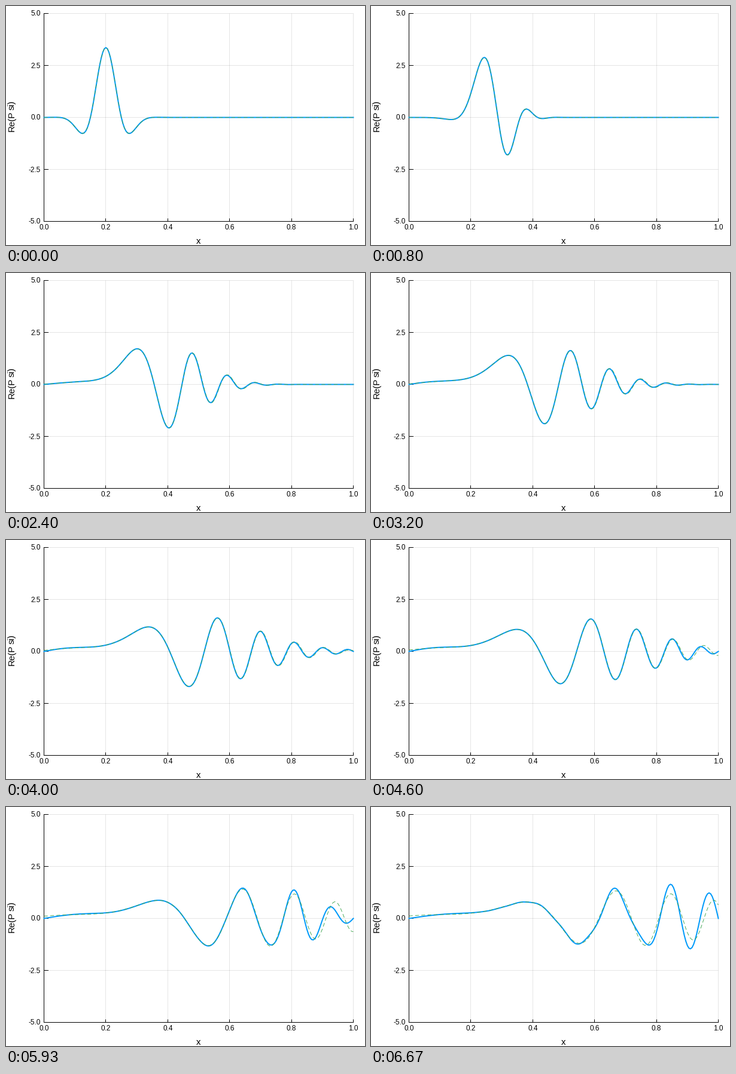
Write a matplotlib script that moves like this. It is 600 by 400 pixels and loops after 6740 ms.

```python
import numpy as np
import matplotlib.pyplot as plt
from matplotlib.animation import FuncAnimation

W, H, DPI = 600, 400, 100
LEFT, RIGHT, TOP, BOTTOM = 63.5, 580.5, 12.5, 360.5
TICK_MS, LOOP_MS = 10, 6740
FPS, LAST = 15, 100
BLUE, GREEN = "#009afa", "#3da44d"

# wave packet and grid
X0, SIGMA, K0 = 0.2, 0.05, 10 * np.pi
STEP = 1.575e-4
N = 200
DX = 1 / N
x = np.linspace(0, 1, N + 1)


def packet(t):
    """Freely spreading Gaussian packet."""
    spread = 1 + 1j * t / SIGMA**2
    xi = x - X0
    norm = (np.pi * SIGMA**2) ** -0.25 / np.sqrt(spread)
    envelope = np.exp(-((xi - K0 * t) ** 2) / (2 * SIGMA**2 * spread))
    return norm * envelope * np.exp(1j * (K0 * xi - K0**2 * t / 2))


# modes of the finite-difference box with walls at 0 and 1
modes = np.arange(1, N)
sines = np.sin(np.pi * np.outer(x, modes))
energy = (1 - np.cos(np.pi * modes * DX)) / DX**2
coeffs = 2 * DX * sines.T @ packet(0)


def boxed(t):
    """Packet evolved on the grid between the walls."""
    return sines @ (coeffs * np.exp(-1j * energy * t))


def to_x(v):
    return LEFT + (RIGHT - LEFT) * v


def to_y(v):
    return (TOP + BOTTOM) / 2 - (BOTTOM - TOP) * v / 10


def center(p):
    """Middle of the pixel that holds p, for crisp lines."""
    return np.floor(p) + 0.5


def pt(n):
    return n * 72 / DPI


plt.rcParams["font.family"] = "Liberation Sans"

fig = plt.figure(figsize=(W / DPI, H / DPI), dpi=DPI, facecolor="white")
ax = fig.add_axes([0, 0, 1, 1])
ax.set(xlim=(0, W), ylim=(H, 0))
ax.axis("off")

x_ticks, y_ticks = np.linspace(0, 1, 6), np.linspace(-5, 5, 5)
cols, rows = center(to_x(x_ticks)), center(to_y(y_ticks))
line = dict(color="black", lw=pt(1), snap=False)
ax.vlines(cols[1:], TOP, BOTTOM, alpha=0.1, zorder=1, **line)
ax.hlines(rows[1:], LEFT, RIGHT, alpha=0.1, zorder=1, **line)
ax.vlines(LEFT, TOP - 0.5, BOTTOM + 0.5, **line)
ax.hlines(BOTTOM, LEFT - 0.5, RIGHT + 0.5, **line)
ax.vlines(cols, BOTTOM - 5, BOTTOM, **line)
ax.hlines(rows, LEFT, LEFT + 7.5, **line)


def label(px, py, text, size=15, **kw):
    ax.text(px, py, text, fontsize=pt(size), va="baseline", **kw)


for v in x_ticks:
    label(to_x(v), 374, f"{v:.1f}", 11.7, ha="center")
for v in y_ticks:
    label(58, to_y(v) + 4, f"{v:.1f}", 11.7, ha="right")
label(322, 398, "x", ha="center")
side_on = dict(rotation=90, rotation_mode="anchor", ha="left")
label(14, 210.5, "Re(P", **side_on)
label(14, 174.5, "si)", **side_on)

solid, = ax.plot([], [], color=BLUE, lw=pt(2), zorder=3)
dashed, = ax.plot([], [], color=GREEN, lw=pt(0.9), dashes=(7, 4.5),
                  dash_capstyle="butt", zorder=4)


def draw(i):
    n = min(int((i + 0.5) * TICK_MS * FPS / 1000), LAST)
    t = n * STEP
    solid.set_data(to_x(x), to_y(boxed(t).real))
    dashed.set_data(to_x(x), to_y(packet(t).real))
    return solid, dashed


anim = FuncAnimation(fig, draw, frames=LOOP_MS // TICK_MS, interval=TICK_MS,
                     init_func=lambda: draw(0), repeat=True, repeat_delay=0)
plt.show()
```
